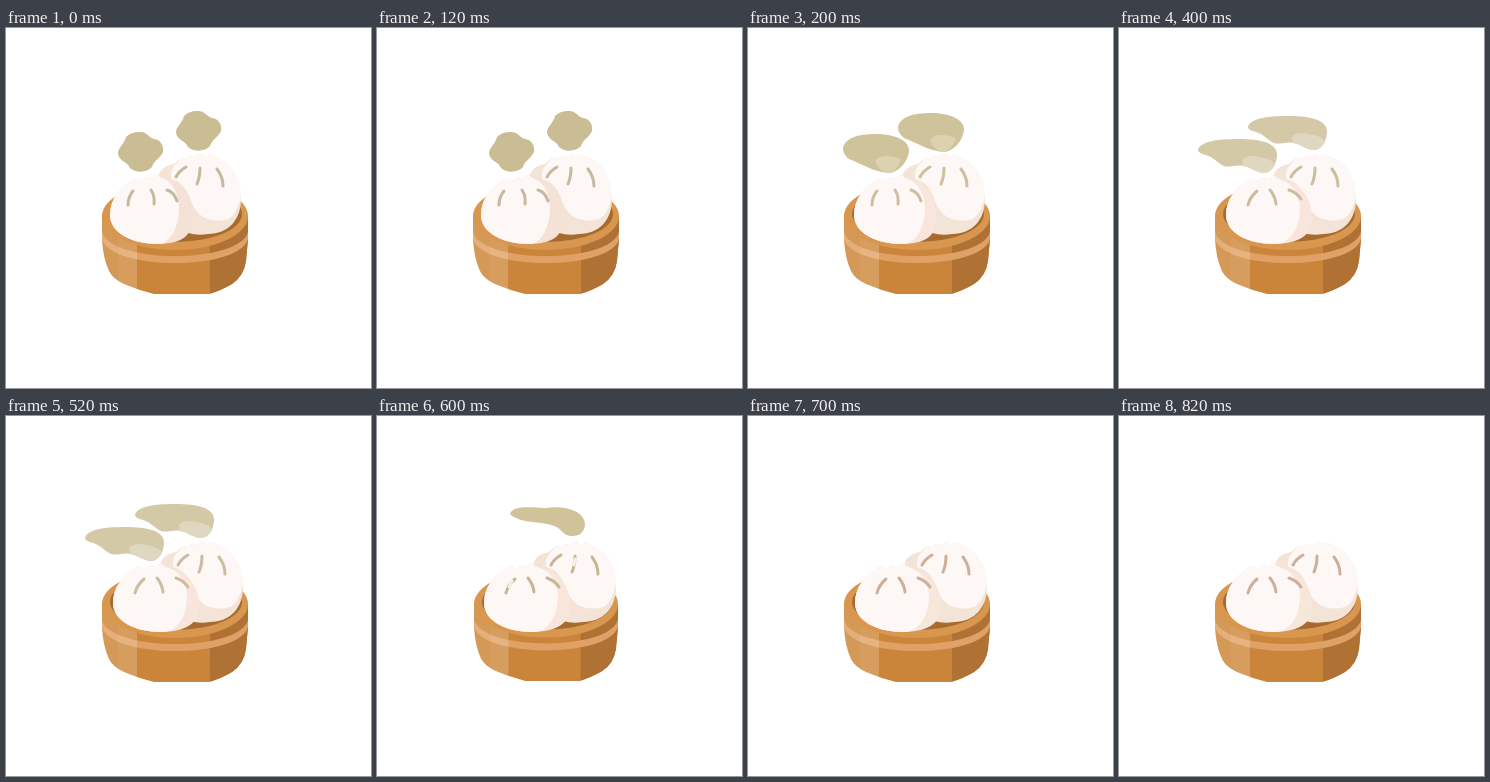
An HTML page with a canvas that plays this animation: 365x360 px, repeating every 900 ms.

```html
<!DOCTYPE html>
<html lang="en">
<head>
<meta charset="utf-8">
<title>Steamed buns</title>
<style>
html, body { margin: 0; height: 100%; overflow: hidden; background: #fff; }
canvas { display: block; }
</style>
</head>
<body>
<canvas id="stage" width="365" height="360"></canvas>
<script>
const ctx = document.getElementById('stage').getContext('2d');
const LOOP = 900;

// front/back: sideways shift of each bun; wide: extra width of the front bun
const poses = [
  { until: 200, front: 0, wide: 0, back: 0, fold: '#c8b8a0', shade: '#f3e2d5', steam: 'puff' },
  { until: 400, front: 2, wide: 0, back: 2, fold: '#cfbf9c', shade: '#f8e5dc', steam: 'fan' },
  { until: 600, front: 3, wide: 4, back: 2, fold: '#cdbd9e', shade: '#f8e6dc', steam: 'wisp' },
  { until: 700, front: 3, wide: 4, back: 4, fold: '#c9b594', shade: '#f8e6dc', steam: 'tail', hollow: true, squeeze: 0.986 },
  { until: 900, front: 3, wide: 4, back: 4, fold: '#cdb09a', shade: '#f7e6da' }
];

const steams = {
  puff: {
    color: '#cabd94', at: [[0, 0], [58, -21]],
    body: 'M133 104C140 103 142 109 148 111C155 112 158 118 157 124C154 131 148 132 146 139C141 145 129 145 124 140C122 134 113 133 112 126C112 119 118 117 120 109Q125 104 133 104Z'
  },
  fan: {
    color: '#cfc39c', light: '#dcd2b0', at: [[0, 0], [55, -21]],
    body: 'M95 121C96 110 110 106 128 106C148 106 161 113 161 122C161 132 151 145 140 145C126 144 114 136 101 131Q95 126 95 121Z',
    glow: 'M127 133C132 126 145 127 153 132Q148 144 140 145Q130 143 127 133Z'
  },
  wisp: {
    color: '#d4c9a7', light: '#dfd7bf', at: [[0, 0], [50, -23]],
    body: 'M79 122C81 114 96 111 119 111C143 111 158 115 158 127C158 135 153 144 146 145C137 145 132 139 124 138C117 136 109 141 103 137C98 134 94 129 87 127Q79 125 79 122Z',
    glow: 'M123 132Q128 126 140 129Q154 131 156 137Q152 144 146 145C137 145 132 139 124 138Z'
  },
  tail: {
    color: '#d0c39a', at: [[0, 0]],
    body: 'M133 98C135 90 151 91 168 92C191 89 208 96 208 109C207 118 201 120 194 120C184 119 186 112 174 109C160 105 142 107 133 98Z'
  }
};

function fill(path, color) {
  ctx.fillStyle = color;
  ctx.fill(new Path2D(path));
}

function shifted(x, y, draw) {
  ctx.save();
  ctx.translate(x, y);
  draw();
  ctx.restore();
}

function ellipse(x, y, rx, ry, color) {
  ctx.fillStyle = color;
  ctx.beginPath();
  ctx.ellipse(x, y, rx, ry, 0, 0, Math.PI * 2);
  ctx.fill();
}

function folds(path, color) {
  ctx.strokeStyle = color;
  ctx.lineWidth = 3;
  ctx.lineCap = 'round';
  ctx.stroke(new Path2D(path));
}

function basket() {
  const side = 'M96 188V211Q97 230 103 243Q107 251 118 256Q132 262 148 266H203Q214 263 226 256Q238 248 240 233L242 211V188Z';
  fill(side, '#ca853b');
  ctx.save();
  ctx.clip(new Path2D(side));
  fill('M204 180H245V270H204Z', '#af7234');
  fill('M96 204C105 236 233 236 242 204V211C233 243 105 243 96 211Z', '#dfa166');
  fill('M90 180H131V270H90Z', 'rgba(255, 235, 215, .18)');
  fill('M112 180H131V270H112Z', 'rgba(255, 235, 215, .06)');
  ctx.restore();
  ellipse(169, 188, 73, 34, '#d9964f');
  ellipse(170, 186, 66, 28, '#a76b2f');
}

function backBun(pose) {
  fill('M152 150Q154 138 168 136L175 130L181 131Q183 126 190 129Q195 123 199 129Q206 125 211 130L216 132C229 140 235 155 235 171C235 192 222 206 202 206Q185 209 172 200Z', '#f4e4d7');
  fill('M165 151Q164 141 170 136L175 130L181 131Q183 126 190 129Q195 123 199 129Q206 125 211 130L216 132C229 140 235 155 235 168Q231 187 222 191Q209 195 197 189Q189 184 185 173Q179 154 165 151Z', '#fdf7f6');
  folds('M180 139Q173 143 170 149M194 140Q194 149 191 156M211 141Q217 149 217 158', pose.fold);
  if (pose.hollow) folds('M194 143L193 149', '#f7efe6');
}

function frontBun(pose) {
  const w = pose.wide;
  const top = 'M104 187C104 171 114 160 125 153Q128 148 134 152L137 153Q140 146 146 151Q151 144 155 150L160 152';
  const bottom = 'C126 216 104 205 104 187Z';
  fill(`${top}C178 153 ${187 + w} 172 ${186 + w} 190C${187 + w} 207 176 216 152 216${bottom}`, pose.shade);
  const edge = 172 + pose.front + w / 2;
  fill(`${top}Q${edge} 159 ${edge + 1} 180C${edge + 1} 198 ${edge - 7} 216 152 216${bottom}`, '#fdf7f6');
  folds(`M${127 + w * 2} 163Q${122 + w * 1.5} 169 ${122 + w} 177
    M${145 + w * 0.75} 162Q${149 + w} 168 ${148 + w * 1.5} 176
    M${161 + w * 1.5} 162Q${168 + w * 1.5} 164 ${171 + w * 2} ${173 - w / 2}`, pose.fold);
  if (pose.hollow) folds('M132 165L129 171', '#f7efe6');
}

function steam({ color, light, at, body, glow }) {
  for (const [x, y] of at) {
    shifted(x, y, () => {
      fill(body, color);
      if (glow) fill(glow, light);
    });
  }
}

function draw(time) {
  const t = time % LOOP;
  const pose = poses.find(p => t < p.until);
  ctx.fillStyle = '#fff';
  ctx.fillRect(0, 0, 365, 360);
  ctx.save();
  const k = pose.squeeze || 1;
  ctx.translate(169 * (1 - k), 193 * (1 - k));
  ctx.scale(k, k);
  basket();
  ctx.restore();
  shifted(pose.back, 0, () => backBun(pose));
  shifted(pose.front, 0, () => frontBun(pose));
  if (pose.steam) steam(steams[pose.steam]);
}

const start = performance.now();
function tick() {
  draw(performance.now() - start);
  requestAnimationFrame(tick);
}
tick();
</script>
</body>
</html>
```
